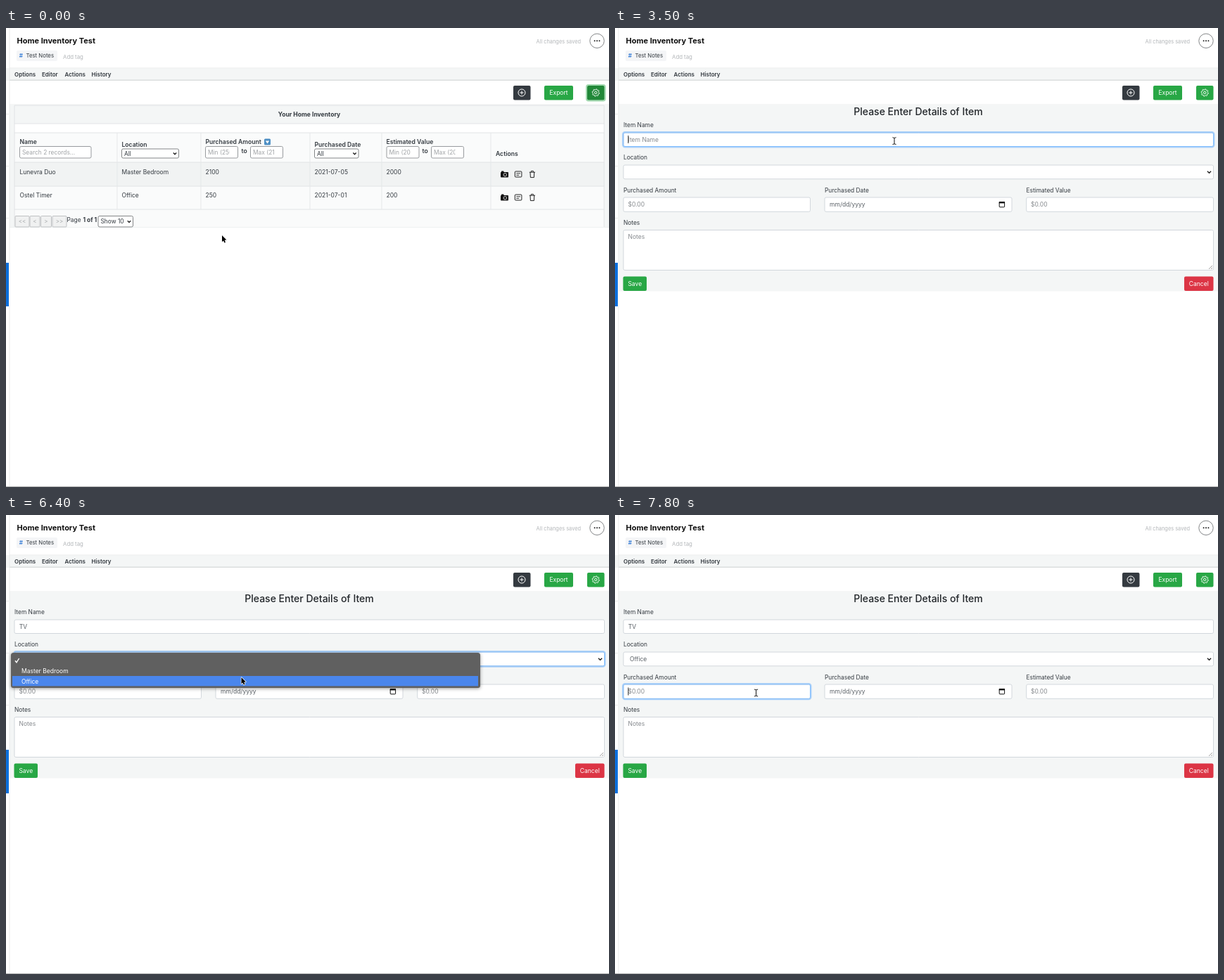
An HTML page with a canvas that plays this animation: 857 px wide and 653 px high, repeating every 8000 ms.

```html
<!DOCTYPE html>
<html lang="en">
<head>
<meta charset="utf-8">
<title>Home Inventory</title>
<style>
html, body { margin: 0; width: 100%; height: 100%; overflow: hidden; background: #fff; }
canvas { display: block; width: 857px; height: 653px; }
</style>
</head>
<body>
<canvas id="stage"></canvas>
<script>
const W = 857, H = 653, LOOP = 8000;
const PANEL = '#f4f6f6', LINE = '#dfe2e4', INK = '#343a40', GREY = '#85898d';
const GREEN = '#28a745';
const dpr = window.devicePixelRatio || 1;

function prepare(canvas) {
  canvas.width = W * dpr;
  canvas.height = H * dpr;
  const c = canvas.getContext('2d');
  c.scale(dpr, dpr);
  return c;
}
const screen = prepare(document.getElementById('stage'));
const layer = document.createElement('canvas');
const layerCtx = prepare(layer);
let g = screen;

const span = (a, b, n) => Array.from({ length: n }, (_, i) => Math.round(a + (b - a) * i / (n - 1)));
const TICKS = [0, 150, ...span(300, 1100, 9), 1200, 1600, ...span(2100, 2680, 7), 2970, 3100, 3500,
  4080, 4180, 4580, ...span(5200, 5400, 3), ...span(5600, 5880, 4), 6200, ...span(6400, 6680, 4),
  6980, ...span(7200, 7800, 7)];

// Pointer path: time, x, y
const PATH = [[0, 307, 295], [150, 726, 167], [300, 733, 100], [400, 733, 92], [1200, 733, 92],
  [1600, 640, 76], [2100, 417.5, 68], [2200, 404, 90], [2500, 397, 155], [2680, 397, 159],
  [5600, 397, 165], [5880, 372, 195], [6200, 350, 217], [6400, 334.5, 231], [6680, 335, 236],
  [7400, 335, 236], [7600, 205, 249], [7700, 200.5, 253]];

function pointerAt(t) {
  const i = PATH.findIndex(p => p[0] > t);
  if (i < 0) return PATH[PATH.length - 1].slice(1);
  const [ta, xa, ya] = PATH[i - 1], [tb, xb, yb] = PATH[i];
  const k = (t - ta) / (tb - ta);
  return [xa + (xb - xa) * k, ya + (yb - ya) * k];
}

function rect(x, y, w, h, fill) {
  g.fillStyle = fill;
  g.fillRect(x, y, w, h);
}

function box(x, y, w, h, r, fill, stroke, lw = 1) {
  g.beginPath();
  g.roundRect(x, y, w, h, r);
  if (fill) { g.fillStyle = fill; g.fill(); }
  if (stroke) { g.strokeStyle = stroke; g.lineWidth = lw; g.stroke(); }
}

function line(points, color, lw = 1) {
  g.beginPath();
  points.forEach(([x, y], i) => i ? g.lineTo(x, y) : g.moveTo(x, y));
  g.strokeStyle = color;
  g.lineWidth = lw;
  g.stroke();
}

function circle(x, y, r, fill, stroke, lw = 1) {
  g.beginPath();
  g.arc(x, y, r, 0, Math.PI * 2);
  if (fill) { g.fillStyle = fill; g.fill(); }
  if (stroke) { g.strokeStyle = stroke; g.lineWidth = lw; g.stroke(); }
}

// y is the middle of the capitals
function text(s, x, y, { size = 8.4, weight = 400, color = INK, align = 'left' } = {}) {
  g.font = `${weight} ${size}px Inter, "Open Sans", sans-serif`;
  g.fillStyle = color;
  g.textAlign = align;
  g.fillText(s, x, y + size * 0.36);
}

const chevron = (x, y, s = 2.6) => line([[x - s, y - s / 2], [x, y + s / 2], [x + s, y - s / 2]], '#222', 1.4);

function button(x, w, y, fill, label) {
  box(x, y, w, 20.5, 2, fill);
  if (label) text(label, x + w / 2, y + 10.3, { color: '#fff', align: 'center', size: 8.5 });
}

function gear(x, y) {
  g.beginPath();
  for (let i = 0; i < 32; i++) {
    const a = (i + 0.5) * Math.PI / 16, r = i % 4 < 2 ? 5.2 : 4;
    g.lineTo(x + r * Math.cos(a), y + r * Math.sin(a));
  }
  g.closePath();
  g.strokeStyle = '#fff';
  g.lineWidth = 0.9;
  g.stroke();
  circle(x, y, 1.7, null, '#fff', 0.9);
}

function header(gearFocus, plusFocus) {
  text('Home Inventory Test', 15.5, 18.5, { size: 11, weight: 700, color: '#111' });
  box(15, 32, 58, 15, 2, '#f4f5f7');
  text('#', 18.8, 39.6, { size: 8, weight: 700, color: '#3f83d8' });
  text('Test Notes', 28.5, 39.6, { size: 7.8 });
  text('Add tag', 81, 41.3, { size: 7.8, color: '#b4b7ba' });
  text('All changes saved', 753.5, 19, { size: 7.4, color: '#b4b7ba' });
  circle(840, 18.3, 10.2, '#fff', '#77797b', 0.9);
  for (const dx of [-3.4, 0, 3.4]) circle(840 + dx, 18.3, 1, '#222');

  rect(0, 57, W, 18, PANEL);
  rect(5, 56.5, W - 5, 0.8, '#e9ebeb');
  rect(5, 73.5, W - 5, 1.5, '#dcdfdf');
  [['Options', 12], ['Editor', 51], ['Actions', 83.5], ['History', 121.5]]
    .forEach(([s, x]) => text(s, x, 66, { size: 8, weight: 600 }));

  rect(5, 108.6, W - 5, 0.8, '#e6e8e8');
  if (plusFocus) box(720, 81, 26.5, 22.5, 3, null, 'rgba(82,88,93,.5)', 2);
  button(721, 24.5, 82, plusFocus ? '#23272b' : '#343a40');
  circle(733, 92, 5, null, '#fff');
  line([[730.4, 92], [735.6, 92]], '#fff');
  line([[733, 89.4], [733, 94.6]], '#fff');
  button(765, 41, 82, GREEN, 'Export');
  if (gearFocus) box(825, 81, 26.5, 22.5, 3, null, 'rgba(72,180,97,.5)', 2);
  button(826, 24.5, 82, gearFocus ? '#218838' : GREEN);
  gear(838.2, 92);
}

function frame() {
  rect(4.6, 0, 0.8, H, '#e3e5e6');
  for (const y of [122, 196, 270]) rect(0, y, 4, 0.8, '#e6e6e6');
  rect(0, 334, 4, 62, '#0b6fdc');
  rect(0, 652, W, 1, '#b4b4b4');
}

function filterInput(x, y, w, hint, clip = 3) {
  box(x, y, w, 16.5, 2, '#fff', '#8d9093', 0.9);
  g.save();
  g.beginPath();
  g.rect(x, y, w - clip, 17);
  g.clip();
  text(hint, x + 3.5, y + 8.4, { color: '#a0a3a6' });
  g.restore();
}

function filterSelect(x, y, w, label, h = 13) {
  box(x, y, w, h, 2, '#fff', '#77797b', 0.9);
  text(label, x + 3.5, y + h / 2);
  chevron(x + w - 5.5, y + h / 2 + 0.2, 2.2);
}

function rowIcons(y) {
  box(703, y - 3, 11, 7.6, 1, '#111');
  box(704, y - 4.4, 3.5, 2, 0.5, '#111');
  circle(709.3, y + 0.8, 2.2, null, '#fff', 0.8);
  box(723.3, y - 4, 9.6, 8, 1, null, '#222', 1);
  line([[725.3, y - 1.2], [731, y - 1.2]], '#222', 0.9);
  line([[725.3, y + 1.3], [729.2, y + 1.3]], '#222', 0.9);
  line([[743.8, y - 2.8], [752, y - 2.8]], '#222', 1);
  line([[746.4, y - 3], [746.4, y - 4.6], [749.4, y - 4.6], [749.4, y - 3]], '#222', 0.9);
  line([[745, y - 2.8], [745.4, y + 4.6], [750.4, y + 4.6], [750.8, y - 2.8]], '#222', 1);
}

function inventory() {
  const soft = '#fafbfb';
  rect(5, 109, W - 5, 175, PANEL);
  rect(12, 136, 838, 13, '#fff');
  rect(12, 149, 838, 135, soft);
  rect(12, 191, 838, 34, '#f1f3f3');
  for (const y of [110, 136, 149, 191, 225, 258]) rect(12, y - 0.4, 838, 0.9, LINE);
  for (const x of [12, 850]) rect(x - 0.4, 110, 0.9, 173, LINE);
  for (const x of [158, 277, 432, 534, 689]) rect(x - 0.5, 149, 0.9, 109, '#e4e7e8');
  rect(5, 283.3, W - 5, 0.8, '#eceeee');
  text('Your Home Inventory', 431, 123, { size: 8.6, weight: 700, align: 'center' });

  const head = { size: 8.6, weight: 600 };
  text('Name', 19.5, 162, head);
  text('Location', 164.5, 166, head);
  text('Purchased Amount', 283.5, 162, head);
  text('Purchased Date', 438.5, 166, head);
  text('Estimated Value', 540.5, 162, head);
  text('Actions', 696, 179, head);
  box(367, 157.5, 9, 9, 1.5, '#4e8fc4');
  g.beginPath();
  g.moveTo(368.8, 160.4);
  g.lineTo(374.2, 160.4);
  g.lineTo(371.5, 164.6);
  g.fillStyle = '#fff';
  g.fill();

  filterInput(19.5, 168.5, 101.5, 'Search 2 records...');
  filterInput(283.5, 168.5, 46, 'Min (250)', 12);
  filterInput(347.5, 168.5, 46, 'Max (2100)', 12);
  filterInput(541, 168.5, 46, 'Min (200)', 12);
  filterInput(604.5, 168.5, 46, 'Max (2000)', 12);
  text('to', 334.5, 174.5, head);
  text('to', 591.5, 174.5, head);
  filterSelect(164.5, 172, 81, 'All');
  filterSelect(438.5, 172, 62.5, 'All');

  const xs = [19.5, 164.5, 283.5, 438.5, 540.5];
  [['Lunevra Duo', 'Master Bedroom', '2100', '2021-07-05', '2000'],
   ['Ostel Timer', 'Office', '250', '2021-07-01', '200']].forEach((row, r) => {
    row.forEach((s, i) => text(s, xs[i], 204.8 + r * 33, { size: 8.5 }));
    rowIcons(208 + r * 33);
  });

  [['<<', 13, 20], ['<', 34, 14], ['>', 49.5, 15], ['>>', 66, 20]].forEach(([s, x, w]) => {
    box(x, 267.5, w, 15.5, 1, '#f0f1f1', '#b9bcbe', 0.9);
    text(s, x + w / 2, 275.5, { color: '#a9acae', align: 'center', size: 8 });
  });
  text('Page', 86.5, 273.3);
  text('1 of 1', 109.5, 273.3, { weight: 700 });
  filterSelect(131, 267.5, 49.5, 'Show 10', 15.5);
}

function field(x, y, w, h, focus = 0) {
  if (focus) {
    g.globalAlpha = focus;
    box(x - 0.8, y - 0.8, w + 1.6, h + 1.6, 3, null, 'rgba(0,123,255,.3)', 2.4);
    g.globalAlpha = 1;
  }
  box(x, y, w, h, 2, '#fff', '#ced4da', 0.9);
  if (focus) {
    g.globalAlpha = focus;
    box(x, y, w, h, 2, null, '#80bdff', 1);
    g.globalAlpha = 1;
  }
}

const caret = (x, y) => rect(x, y - 5.5, 1, 11, '#222');

function form(s) {
  rect(5, 109, W - 5, 265.5, PANEL);
  text('Please Enter Details of Item', 431, 119, { size: 14, weight: 500, color: '#212529', align: 'center' });
  [['Item Name', 12, 138], ['Location', 12, 184.3], ['Purchased Amount', 12, 230.5],
   ['Purchased Date', 298, 230.5], ['Estimated Value', 584.5, 230.5], ['Notes', 12, 277]]
    .forEach(([label, x, y]) => text(label, x, y));

  const hint = { color: GREY, size: 8.5 }, value = { color: '#5b6167', size: 8.5 };
  field(12, 149, 838.5, 19.5, s.nameFocus);
  if (s.name) text(s.name, 18.8, 159, value);
  else text('Item Name', 18.5, 159, hint);
  if (s.nameCaret) caret(s.name ? [19, 24, 29.5][s.name.length] : 18.4, 158.5);

  field(12, 195, 838.5, 19.8, s.placeFocus);
  text(s.place, 21, 205, value);
  chevron(844.5, 205);

  field(12, 241, 265.5, 20.3, s.paidFocus);
  field(298, 241, 266, 20.3);
  field(584.7, 241, 265.8, 20.3);
  text('$0.00', 18.5, 251.4, hint);
  text('mm/dd/yyyy', 305, 251.4, value);
  text('$0.00', 591, 251.4, hint);
  if (s.paidCaret) caret(18.4, 251);
  box(546.2, 247.8, 7.4, 7, 0.8, null, '#111', 1);
  rect(545.8, 247, 8.2, 2.4, '#111');

  field(12, 287.5, 838.5, 57);
  text('Notes', 18.5, 297.3, hint);
  line([[844, 343], [849, 338]], '#888', 0.8);
  line([[847, 343], [849, 341]], '#888', 0.8);
  button(11.5, 33.5, 353.5, GREEN, 'Save');
  button(809, 41.5, 353.5, '#dc3545', 'Cancel');
}

function popup(alpha, active) {
  g = layerCtx;
  g.clearRect(0, 0, W, H);
  g.shadowColor = 'rgba(0,0,0,.4)';
  g.shadowBlur = 5 * dpr;
  g.shadowOffsetY = dpr;
  box(7, 196, 667, 50, 3.5, '#606060');
  g.shadowColor = 'transparent';
  if (active >= 0) rect(9, 199.8 + active * 14.6, 662, 14.4, '#4a86ec');
  line([[13, 207.3], [15, 209.8], [18.6, 204]], '#fff', 1.4);
  text('Master Bedroom', 22, 221.8, { color: '#fff', size: 8.5 });
  text('Office', 22, 236.5, { color: '#fff', size: 8.5 });
  g = screen;
  g.globalAlpha = alpha;
  g.drawImage(layer, 0, 0, W, H);
  g.globalAlpha = 1;
}

function pointer(x, y, beam) {
  if (beam) {
    const arms = [[x - 2.6, y - 5], [x, y - 4.2], [x + 2.6, y - 5]];
    line(arms, '#222', 1);
    line(arms.map(([a, b]) => [a, 2 * y - b]), '#222', 1);
    line([[x, y - 4.2], [x, y + 4.2]], '#222', 1.1);
    return;
  }
  g.beginPath();
  [[0, 0], [0, 9.2], [2, 7.4], [3.4, 10.6], [5, 9.9], [3.7, 6.8], [6.4, 6.6]]
    .forEach(([a, b]) => g.lineTo(x + a, y + b));
  g.closePath();
  g.lineJoin = 'round';
  g.strokeStyle = '#fff';
  g.lineWidth = 1.4;
  g.stroke();
  g.fillStyle = '#000';
  g.fill();
  g.lineJoin = 'miter';
}

function draw(now) {
  const t = TICKS.filter(v => v <= now).pop();
  const within = (a, b) => t >= a && t < b;
  rect(0, 0, W, H, '#fff');
  header(t < 1000, within(1000, 2970));
  if (t < 1200) inventory();
  else form({
    name: t < 4080 ? '' : t < 4180 ? 'T' : 'TV',
    nameFocus: within(2970, 5200) ? (t < 3100 ? 0.6 : 1) : 0,
    nameCaret: within(3500, 4580),
    place: t < 7400 ? '' : 'Office',
    placeFocus: within(5200, 7700) ? (t < 5300 ? 0.75 : 1) : 0,
    paidFocus: t < 7700 ? 0 : t < 7800 ? 0.6 : 1,
    paidCaret: t >= 7800
  });
  frame();
  if (within(5700, 7400)) {
    const active = t < 6200 ? 0 : t < 6400 ? 1 : within(6980, 7200) ? -1 : 2;
    popup(t < 7200 ? 1 : t < 7300 ? 0.85 : 0.45, active);
  }
  if (!within(4080, 5600)) pointer(...pointerAt(t), within(2400, 4080) || t >= 7600);
}

function tick() {
  draw(performance.now() % LOOP);
  requestAnimationFrame(tick);
}
tick();
</script>
</body>
</html>
```
